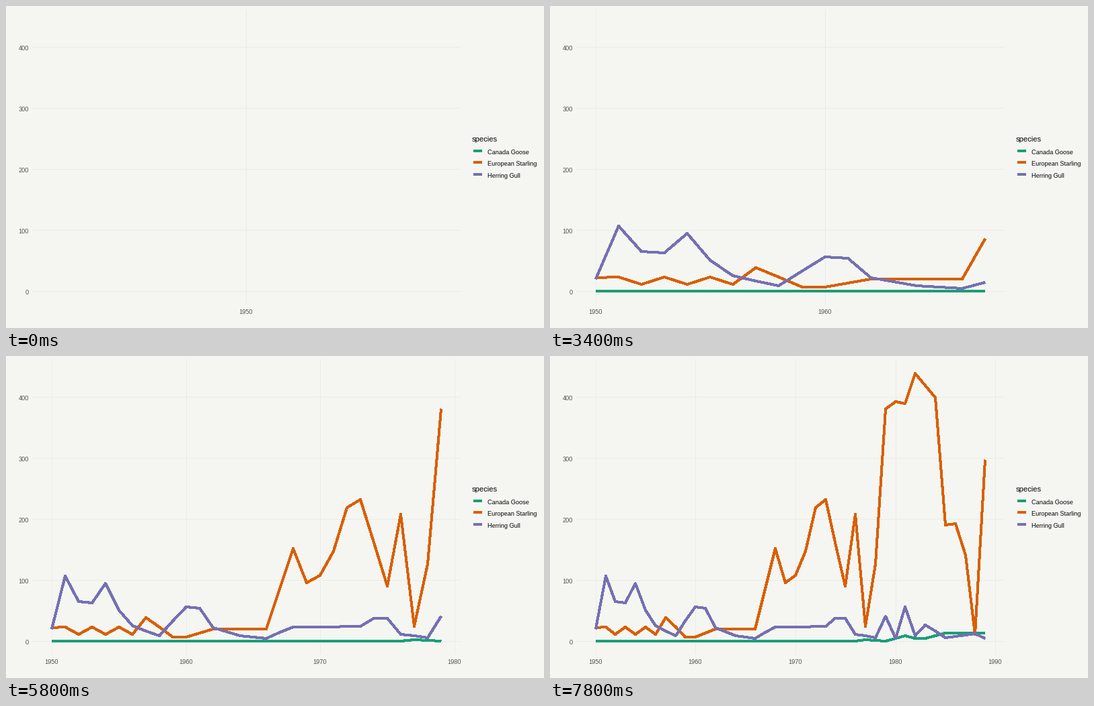
A matplotlib script that plays this animation: 800x480 px, repeating every 8 s.

```python
import math

import matplotlib.pyplot as plt
import numpy as np
from matplotlib.animation import FuncAnimation

W, H, DPI = 800, 480, 100
PX = 72 / DPI                      # points per pixel
BG, GRID = "#f5f6f1", "#ebece7"
START, YEARS = 1950, 40
LEFT, RIGHT = 68.25, 647.74        # x of the first and last year
PANEL = (39, 676, 5, 445)          # left, right, top, bottom
ZERO, UNIT = 425.5, 0.91           # y of zero, pixels per bird

plt.rcParams.update({
    "font.family": "Liberation Sans",
    "text.hinting": "native",
    "text.hinting_factor": 8,
})


def trend(*turns):
    """Yearly counts along straight runs between (year, count) turns."""
    years, counts = zip(*turns)
    return np.interp(np.arange(YEARS), years, counts)


goose = trend((26, 0), (27, 2), (29, 0), (31, 9), (32, 4), (33, 4), (35, 13.5))
starling = trend(
    (0, 22.5), (1, 17.5), (6, 17.5), (7, 38.5), (9, 7), (10, 7), (12, 20),
    (16, 20), (18, 151.5), (19, 96), (20, 108), (21, 147.5), (22, 219),
    (23, 232), (25, 90), (26, 208), (27, 24), (28, 126), (29, 380), (30, 392),
    (31, 389), (32, 438), (34, 399), (35, 190), (36, 192), (37, 141), (38, 11),
    (39, 297))
starling[1:7] += 6 * (-1.0) ** np.arange(6)   # early up-and-down years
gull = trend(
    (0, 20), (1, 107), (2, 65), (3, 63), (4, 95), (5, 51), (6, 25), (8, 9),
    (10, 56), (11, 54), (12, 22), (14, 8.5), (16, 4.5), (18, 23), (23, 24),
    (24, 37), (25, 37), (26, 11), (28, 6), (29, 41), (30, 4.5), (31, 56.5),
    (32, 9), (33, 26), (35, 6), (38, 12), (39, 4))

SERIES = [
    ("Canada Goose", "#1b9e77", goose),
    ("European Starling", "#d95f02", starling),
    ("Herring Gull", "#7570b3", gull),
]

fig = plt.figure(figsize=(W / DPI, H / DPI), dpi=DPI, facecolor=BG)
ax = fig.add_axes([0, 0, 1, 1])
ax.set_xlim(0, W)
ax.set_ylim(H, 0)
ax.axis("off")


def stroke(xs, ys, color, width, z):
    return ax.plot(xs, ys, color=color, lw=width * PX, zorder=z,
                   solid_capstyle="butt", solid_joinstyle="round",
                   antialiased=False, snap=False)[0]


def thick(xs, ys, color, z):
    # without antialiasing every touched pixel is filled, so 3 shows as 4
    return stroke(xs, ys, color, 3, z)


def label(x, y, text, size=9.1, color="black", ha="left"):
    return ax.text(x, y, text, fontsize=size * PX, color=color,
                   ha=ha, va="baseline")


def y_of(count):
    return math.floor(ZERO - count * UNIT)


def x_of(year, span):
    if span == 0:
        return math.floor((LEFT + RIGHT) / 2) if year == START else W
    return math.floor(LEFT + (RIGHT - LEFT) * (year - START) / span)


for count in range(0, 500, 100):
    y = y_of(count)
    stroke(PANEL[:2], [y + 0.5] * 2, GRID, 1, 1)
    label(34, y + 5, str(count), color="#4d4d4d", ha="right")

label(693, 202, "species", size=11.2)
lines = []
for i, (name, color, _) in enumerate(SERIES):
    key_y = int(216 + 17.5 * i)
    thick([695, 708], [key_y] * 2, color, 2)
    label(716, key_y + 5, name)
    lines.append(thick([], [], color, 3 + i))

ticks = []
for year in range(START, START + YEARS + 1, 10):
    rule = stroke([], [], GRID, 1, 1)
    text = label(0, 459, str(year), color="#4d4d4d", ha="center")
    ticks.append((year, rule, text))


def draw(span):
    xs = [x_of(START + k, span) for k in range(span + 1)]
    for line, (_, _, counts) in zip(lines, SERIES):
        line.set_data(xs, [y_of(c) for c in counts[:span + 1]])
        line.set_visible(span > 0)
    for year, rule, text in ticks:
        x = x_of(year, span)
        shown = x <= PANEL[1]
        rule.set_data([x + 0.5] * 2, PANEL[2:])
        text.set_x(x)
        rule.set_visible(shown)
        text.set_visible(shown)
    return []


anim = FuncAnimation(fig, draw, frames=YEARS, interval=200, repeat=True,
                     repeat_delay=0, init_func=lambda: draw(0), blit=False)
plt.show()
```
